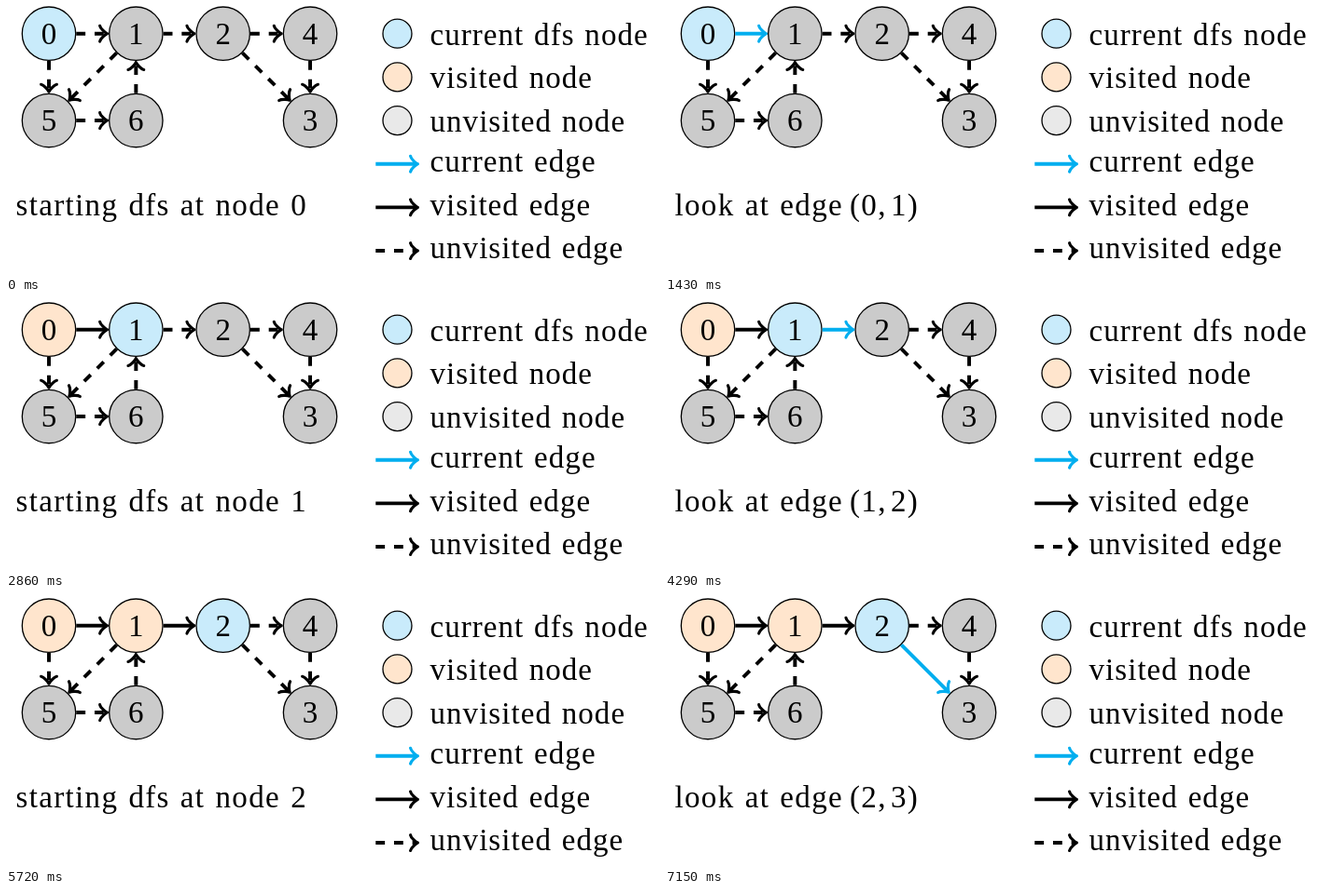
Recreate the animation shown at these times as an HTML page with a canvas. Size 700x288 px, loop 8 s.

```html
<!DOCTYPE html>
<html lang="en">
<head>
<meta charset="utf-8">
<title>Depth-first search</title>
<style>
html, body { margin: 0; width: 100%; height: 100%; overflow: hidden; background: #fff; }
canvas { display: block; }
</style>
</head>
<body>
<canvas id="stage" width="700" height="288"></canvas>
<script>
const ctx = document.getElementById('stage').getContext('2d');
const LOOP = 8000, STEP = 1430;
const PT = 3.28, CELL = 93.35, TOP = 29.7, RADIUS = 28.7, LINE = 1.2 * PT;
const BLUE = '#c9ebfb', ORANGE = '#ffe5cd', GRAY = '#cbcbcb', PALE = '#e9e9e9';
const CYAN = '#00aeef', BLACK = '#000';
const FONT = '33px "Liberation Serif", serif';

// Grid column and row of each node, by label
const nodes = [[0, 0], [1, 0], [2, 0], [3, 1], [3, 0], [0, 1], [1, 1]]
  .map(([col, row]) => ({ x: 46 + col * CELL, y: TOP + row * CELL }));
const edges = [[0, 1], [0, 5], [1, 2], [1, 5], [2, 3], [2, 4], [4, 3], [5, 6], [6, 1]];
const route = [0, 1, 2, 3];

function text(str, x, y, spacing) {
  ctx.fillStyle = BLACK;
  ctx.font = FONT;
  ctx.textAlign = 'left';
  ctx.letterSpacing = spacing + 'px';
  ctx.wordSpacing = '1.5px';
  ctx.fillText(str, x, y);
}

const legendText = (str, y) => text(str, 454.5, y, 1.05);
const caption = (str, x) => text(str, x, 224.8, 1.35);

function disc(x, y, r, fill) {
  ctx.beginPath();
  ctx.arc(x, y, r, 0, Math.PI * 2);
  ctx.fillStyle = fill;
  ctx.fill();
  ctx.strokeStyle = BLACK;
  ctx.lineWidth = 0.4 * PT;
  ctx.stroke();
}

function arrow(x1, y1, x2, y2, color, dashed) {
  const a = (0.28 + 0.3 * 1.2) * PT;
  const end = Math.hypot(x2 - x1, y2 - y1) - 0.75 * a - 0.4 * LINE;
  ctx.save();
  ctx.translate(x1, y1);
  ctx.rotate(Math.atan2(y2 - y1, x2 - x1));
  ctx.strokeStyle = color;
  ctx.lineWidth = LINE;
  ctx.setLineDash(dashed ? [3 * PT, 3 * PT] : []);
  ctx.beginPath();
  ctx.moveTo(0, 0);
  ctx.lineTo(end, 0);
  ctx.stroke();

  ctx.setLineDash([]);
  ctx.translate(end, 0);
  ctx.lineWidth = 0.8 * LINE;
  ctx.lineCap = ctx.lineJoin = 'round';
  ctx.beginPath();
  ctx.moveTo(-3 * a, 4 * a);
  ctx.bezierCurveTo(-2.75 * a, 2.5 * a, 0, 0.25 * a, 0.75 * a, 0);
  ctx.bezierCurveTo(0, -0.25 * a, -2.75 * a, -2.5 * a, -3 * a, -4 * a);
  ctx.stroke();
  ctx.restore();
}

function drawNode(label, fill) {
  const { x, y } = nodes[label];
  disc(x, y, RADIUS, fill);
  ctx.fillStyle = BLACK;
  ctx.font = FONT;
  ctx.textAlign = 'center';
  ctx.letterSpacing = ctx.wordSpacing = '0px';
  ctx.fillText(label, x, y + 11);
}

function drawEdge([from, to], color, dashed) {
  const p = nodes[from], q = nodes[to];
  const d = Math.hypot(q.x - p.x, q.y - p.y);
  const ux = (q.x - p.x) / d * (RADIUS + 0.6);
  const uy = (q.y - p.y) / d * (RADIUS + 0.6);
  arrow(p.x + ux, p.y + uy, q.x - ux, q.y - uy, color, dashed);
}

function drawLegend() {
  const rowY = i => TOP + i * CELL / 2;
  [['current dfs node', BLUE], ['visited node', ORANGE], ['unvisited node', PALE]]
    .forEach(([label, fill], i) => {
      disc(419.5, rowY(i), 15.5, fill);
      legendText(label, rowY(i) + 11.8);
    });
  [['current edge', CYAN], ['visited edge', BLACK], ['unvisited edge', BLACK, true]]
    .forEach(([label, color, dashed], i) => {
      const y = rowY(i + 3);
      arrow(396.3, y, 443, y, color, dashed);
      legendText(label, y + 8.4);
    });
}

function draw(time) {
  const step = Math.floor((time % LOOP) / STEP);
  const depth = step >> 1;
  const looking = step % 2 === 1;
  const current = route[depth], next = route[depth + 1];

  ctx.fillStyle = '#fff';
  ctx.fillRect(0, 0, 700, 288);

  nodes.forEach((_, i) => {
    const at = route.indexOf(i);
    drawNode(i, i === current ? BLUE : at >= 0 && at < depth ? ORANGE : GRAY);
  });
  edges.forEach(edge => {
    const [from, to] = edge;
    const at = route.indexOf(from);
    const onRoute = at >= 0 && route[at + 1] === to;
    const active = looking && onRoute && at === depth;
    const visited = onRoute && at < depth;
    drawEdge(edge, active ? CYAN : BLACK, !active && !visited);
  });

  if (looking) {
    caption('look at edge', 10.5);
    caption(`(${current},`, 198);
    caption(`${next})`, 242);
  } else {
    caption(`starting dfs at node ${current}`, 10.5);
  }
  drawLegend();
}

const start = performance.now();
function tick() {
  draw(performance.now() - start);
  requestAnimationFrame(tick);
}
tick();
</script>
</body>
</html>
```
